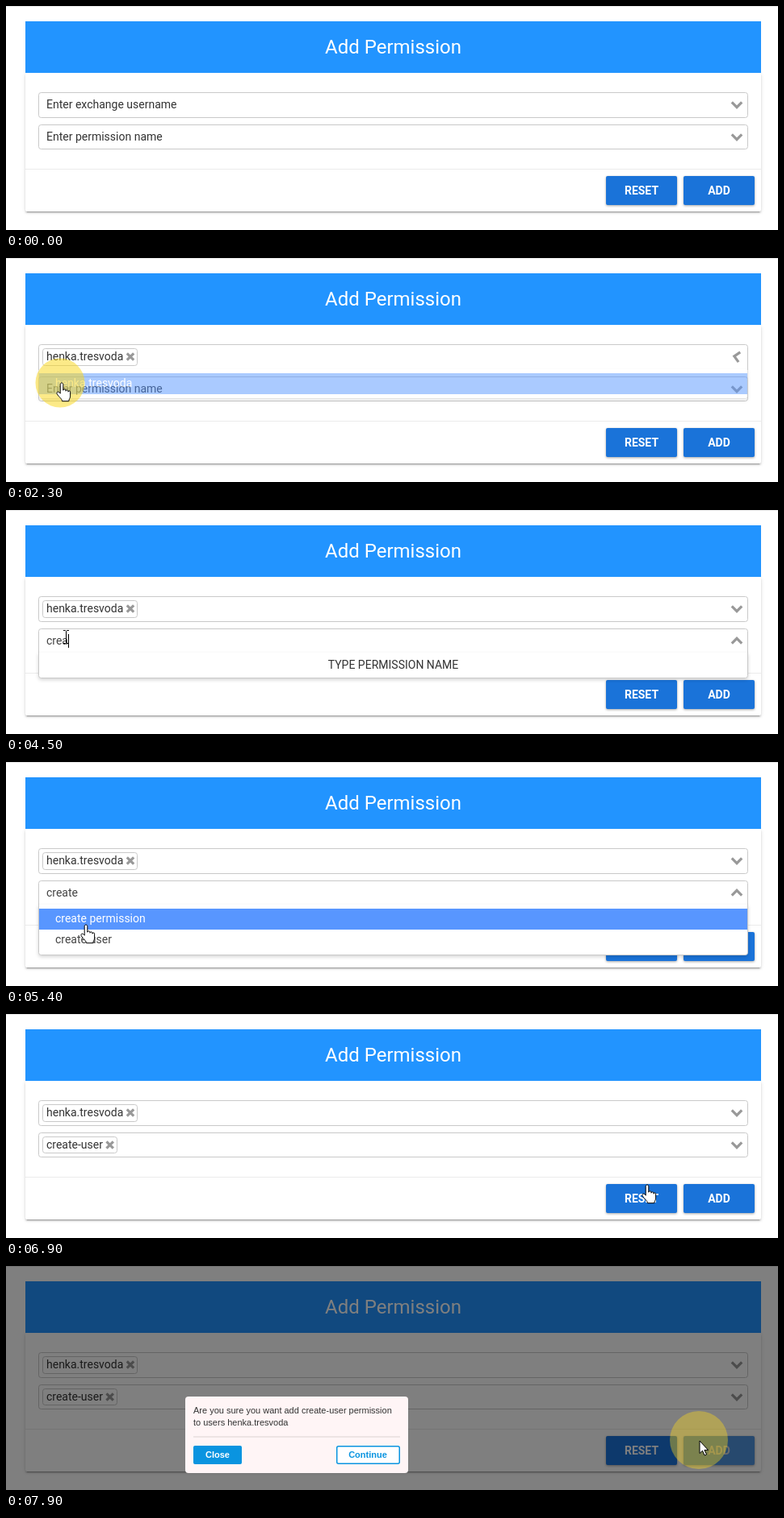
Write an HTML page that moves like this. It is 956 px wide and 278 px high and loops after 8 s.

```html
<!DOCTYPE html>
<html lang="en">
<head>
<meta charset="utf-8">
<title>Add Permission</title>
<style>
  html, body { margin: 0; width: 100%; height: 100%; overflow: hidden; background: #fff; }
  .card {
    position: absolute; left: 24px; top: 83px; width: 911px; height: 172px; background: #fff; border-radius: 2px;
    box-shadow: 0 2px 2px rgba(0,0,0,.14), 0 3px 1px -2px rgba(0,0,0,.2), 0 1px 5px rgba(0,0,0,.12);
  }
  svg { position: absolute; left: 0; top: 0; width: 956px; height: 278px; display: block; }
  text { font: 14px Roboto, sans-serif; fill: #333; }
  .title { font-size: 24px; fill: #fff; }
  .mid { text-anchor: middle; }
  .btn rect { fill: #1a73d9; filter: drop-shadow(0 1px 1.5px rgba(0,0,0,.35)); }
  .btn text { font-weight: 700; fill: #fff; }
  .btn.busy rect { fill: #4f93dd; }
  .btn.busy text { fill: #d8d8d8; }
  .line { fill: #fff; stroke: #c9c9c9; }
  .chev, .cross { fill: none; stroke: #999; stroke-width: 3.2; }
  .typed, .opt { fill: #444; }
  .hint.live { fill: #555; }
  .squig { fill: none; stroke: #e0362c; stroke-width: 1.1; }
  .panel { filter: drop-shadow(0 2px 2px rgba(0,0,0,.16)); }
  .mark { fill: #5896ff; }
  .opt.on { fill: #fff; }
  .modal text { font: 11px "Liberation Sans", Arial, sans-serif; }
  .modal .b { font-weight: 700; }
  .pointer path { fill: #fff; stroke: #000; stroke-linejoin: round; }
  .pointer #ibeam { fill: none; }
</style>
</head>
<body>
<div class="card"></div>
<svg viewBox="0 0 956 278">
  <rect width="956" height="1" fill="#e6e6e6"/>
  <rect x="24" y="19" width="911" height="64" fill="#2294ff"/>
  <text class="title mid" x="479.5" y="59">Add Permission</text>
  <g id="fields"></g>
  <rect x="24" y="202" width="911" height="1" fill="#ebebeb"/>
  <g class="btn"><rect x="743" y="211" width="88" height="36" rx="2"/><text class="mid" x="787" y="234">RESET</text></g>
  <g class="btn" id="add"><rect x="839" y="211" width="88" height="36" rx="2"/><text class="mid" x="883" y="234">ADD</text></g>
  <g id="drops"></g>
  <g id="confirm">
    <rect width="956" height="278" opacity=".5"/>
    <g class="modal">
      <rect x="222" y="162" width="276" height="95" rx="4" fill="#fff5f6"/>
      <text x="232" y="183">Are you sure you want add create-user permission</text>
      <text x="232" y="198">to users <tspan id="who"></tspan></text>
      <rect x="232" y="211.5" width="256" height="1" fill="#dbd3d4"/>
      <rect x="232" y="223" width="60" height="23" rx="2" fill="#0a94e0"/>
      <text class="b mid" x="262" y="238" style="fill:#fff">Close</text>
      <rect x="409.75" y="223.75" width="77.5" height="21.5" rx="2" fill="#fff" stroke="#0a94e0" stroke-width="1.5"/>
      <text class="b mid" x="448" y="238" style="fill:#0a94e0">Continue</text>
    </g>
  </g>
  <circle id="ripple" fill="#fad81e"/>
  <g class="pointer" id="pointer">
    <path id="arrow" d="M1 1v15.5l3.5-3.3 2.6 5.8 2.4-1-2.6-5.6h4.6z"/>
    <path id="hand" d="M.2 2.2c0-3 3.6-3 3.6 0v7c0-1.8 3.2-1.8 3.2 0v1c0-1.8 3-1.8 3 0v1c0-1.8 2.6-1.8 2.6 0v5c0 3.5-1.8 3.5-1.8 6.5H2.5c0-3-4-5-6.3-9-1-2.3 1.4-3.8 3.2-1.5l.8 1z"/>
    <path id="ibeam" d="M-1-7.5h2.5l1 1 1-1h2.5M2.5-6.5v14M-1 8.5h2.5l1-1 1 1h2.5"/>
  </g>
</svg>
<script>
const LOOP = 8000, STEP = 100, USER = 'henka.tresvoda';
const $ = id => document.getElementById(id);
const clamp = v => Math.max(0, Math.min(1, v));
const show = (el, on) => el.setAttribute('visibility', on ? 'visible' : 'hidden');
const set = (el, attrs) => { for (const k in attrs) el.setAttribute(k, attrs[k]); };

// typing: [time, text]; the caret restarts its blink at each entry
const specs = [
  { top: 107, bottom: 139, hint: 'Enter exchange username', msg: 'TYPE EXCHANGE USERNAME',
    open: 100, close: 2200, list: 1400, options: [USER], chip: USER, squiggle: true,
    typing: [[100, ''], [400, USER]] },
  { top: 147, bottom: 178, hint: 'Enter permission name', msg: 'TYPE PERMISSION NAME',
    open: 3100, close: 5900, list: 5100, options: ['create permission', 'create-user'], chip: 'create-user',
    typing: [[3100, ''], [3900, 'c'], [4200, 'cr'], [4400, 'cre'], [4500, 'crea'], [4700, 'creat'], [4900, 'create']] }
];

const clicks = [[2200, 67, 155], [3100, 72, 157], [5900, 102, 210], [7700, 858, 216]];
const easeOut = u => 1 - (1 - u) ** 3;
const smooth = u => u * u * (3 - 2 * u);
const square = u => u * u;
// start, end, from, to, easing for x and y
const moves = [
  [1600, 2000, [55, 118], [67, 155], smooth, smooth],
  [2400, 2700, [67, 155], [72, 157], smooth, smooth],
  [5100, 5500, [72, 157], [102, 210], smooth, smooth],
  [6400, 7300, [102, 210], [858, 216], easeOut, square]
];

function pointerAt(t) {
  let p = moves[0][2];
  for (const [a, b, from, to, ex, ey] of moves) {
    if (t < a) break;
    const u = clamp((t - a) / (b - a));
    p = [from[0] + (to[0] - from[0]) * ex(u), from[1] + (to[1] - from[1]) * ey(u)];
  }
  return p;
}

function build(f) {
  const base = f.top + 20, end = f.bottom;
  const row = (o, i) => `<text class="opt" x="61" y="${end + 21 + 26 * i}">${o}</text>`;
  $('fields').insertAdjacentHTML('beforeend', `<g>
    <path class="line frame"/>
    <text class="hint" x="50" y="${base}">${f.hint}</text>
    <text class="typed" x="50" y="${base}"></text>
    <path class="squig" d="M50 ${base + 4}${'l2-2 2 2'.repeat(24)}"/>
    <rect class="caret" y="${f.top + 7}" width="1" height="17"/>
    <g class="chip">
      <rect class="line" x="45.5" y="${f.top + 5.5}" height="${end - f.top - 11}" rx="3"/>
      <text x="50" y="${base}">${f.chip}</text>
      <path class="cross" d="M-4.2-4.2l8.4 8.4M4.2-4.2l-8.4 8.4"/>
    </g>
    <path class="chev" d="M-6.2-3.2L0 3.2 6.2-3.2"/></g>`);
  $('drops').insertAdjacentHTML('beforeend', `<g class="panel">
    <path class="line box"/>
    <text class="msg mid" x="479.5" y="${end + 19}">${f.msg}</text>
    <g class="rows"><rect class="mark" x="41" width="877" height="26"/>${f.options.map(row).join('')}</g></g>`);
  const body = $('fields').lastElementChild, drop = $('drops').lastElementChild;
  for (const k of ['frame', 'hint', 'typed', 'squig', 'caret', 'chip', 'chev']) f[k] = body.querySelector('.' + k);
  for (const k of ['box', 'msg', 'rows', 'mark']) f[k] = drop.querySelector('.' + k);
  f.drop = drop;
  f.opts = [...drop.querySelectorAll('.opt')];
}

function fade(f, t) {
  if (t < f.open) return 0;
  return t < f.close ? clamp(.15 + (t - f.open) / 350) : clamp(.75 - (t - f.close) / 400);
}

function drawField(f, t, py) {
  const alpha = fade(f, t), top = f.top + .5, end = f.bottom;
  const sides = `M40.5 ${end}V${top + 3}q0-3 3-3H915.5q3 0 3 3V${end}`;
  f.frame.setAttribute('d', alpha ? sides
    : `M43.5 ${top}H915.5q3 0 3 3V${end - 3.5}q0 3-3 3H43.5q-3 0-3-3V${top + 3}q0-3 3-3z`);

  const active = t >= f.open && t < f.close;
  const [since, text] = f.typing.filter(k => k[0] <= t).pop() || [0, ''];
  const done = t >= f.close;
  if (f.typed.textContent !== text) f.typed.textContent = text;
  show(f.typed, !done);
  show(f.hint, !done && !text);
  f.hint.classList.toggle('live', active);
  show(f.squig, f.squiggle && active && text);
  show(f.caret, active && Math.floor((t - since) / 500) % 2 === 0);
  f.caret.setAttribute('x', Math.round(50 + (text ? f.typed.getComputedTextLength() : 0)));

  show(f.chip, done);
  const [frame, label, cross] = f.chip.children, len = label.getComputedTextLength();
  frame.setAttribute('width', Math.round(len + 22));
  cross.setAttribute('transform', `translate(${50 + len + 8.7} ${f.top + 15.5})`);

  const turn = done ? Math.max(0, 160 - (t - f.close) * .6) : 180 * clamp((t - f.open) / 300);
  f.chev.setAttribute('transform', `translate(905 ${f.top + 15.5}) rotate(${turn})`);

  const listed = t >= f.list;
  const low = end + (listed ? 10 + 26 * f.options.length : 31) - .5;
  f.drop.setAttribute('opacity', alpha);
  f.box.setAttribute('d', `M40.5 ${end - 1}V${low - 3}q0 3 3 3H915.5q3 0 3-3V${end - 1}`);
  show(f.msg, !listed);
  show(f.rows, listed);
  const pick = f.options.length > 1 && py >= end + 30 ? 1 : 0;
  f.mark.setAttribute('y', end + 4 + 26 * pick);
  f.opts.forEach((o, i) => o.classList.toggle('on', i === pick));
}

function pointerKind(t, x, y) {
  const onList = specs.some(f => t >= f.list && fade(f, t) > 0 && y >= f.bottom + 4);
  const onButton = y >= 211 && (x >= 743 && x <= 831 || x >= 839 && x <= 927);
  if (onList || onButton && t < 7700) return 'hand';
  return specs.some(f => y >= f.top && y <= f.bottom) ? 'ibeam' : 'arrow';
}

function draw(t) {
  const [x, y] = pointerAt(t);
  specs.forEach(f => drawField(f, t, y));

  const kind = pointerKind(t, x, y);
  for (const k of ['arrow', 'hand', 'ibeam']) show($(k), t >= 100 && k === kind);
  $('pointer').setAttribute('transform', `translate(${Math.round(x)} ${Math.round(y)})`);

  const hit = clicks.find(c => t >= c[0] && t < c[0] + 400);
  show($('ripple'), hit);
  if (hit) {
    const n = (t - hit[0]) / 100;
    set($('ripple'), { cx: hit[1], cy: hit[2], r: 25 + 5.5 * n, opacity: .65 - .125 * n });
  }

  $('add').classList.toggle('busy', t >= 7700);
  $('confirm').setAttribute('opacity', clamp((t - 7700) / 200));
}

$('who').textContent = USER;
specs.forEach(build);

function tick() {
  const t = performance.now() % LOOP;
  draw(Math.floor(t / STEP) * STEP);
  requestAnimationFrame(tick);
}
tick();
</script>
</body>
</html>
```
